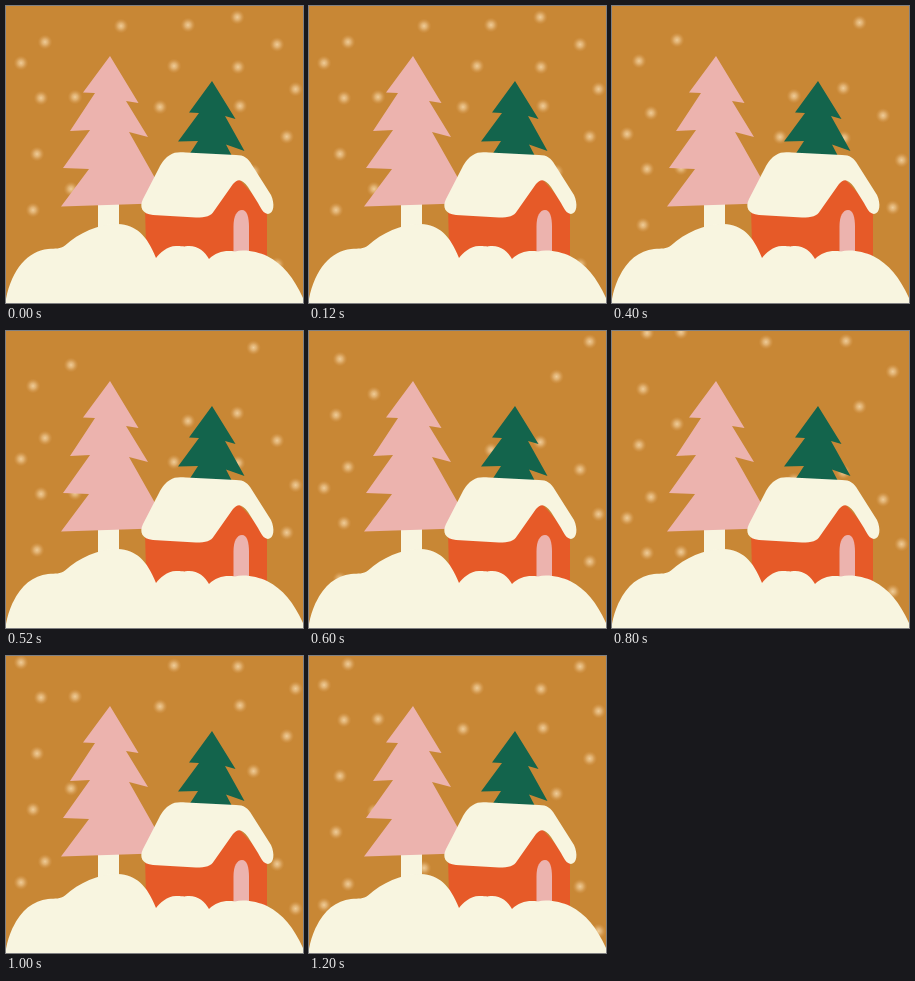
Write an HTML page that moves like this. It is 297 px wide and 297 px high and loops after 1400 ms.

```html
<!DOCTYPE html>
<html lang="en">
<head>
<meta charset="utf-8">
<title>Snowy cabin</title>
<style>
  html, body { margin: 0; width: 100%; height: 100%; overflow: hidden; background: #c88735; }
  svg { display: block; width: 100vw; height: 100vh; }
  .snow { fill: #f8f5e0; }
  .pink { fill: #ecb3ae; }
  .green { fill: #13644c; }
  .wall { fill: #e65a28; }
</style>
</head>
<body>
<svg viewBox="0 0 297 297" preserveAspectRatio="none">
  <defs>
    <radialGradient id="glow">
      <stop offset="0" stop-color="#f3d4a4" stop-opacity=".9"/>
      <stop offset=".4" stop-color="#ecc48c" stop-opacity=".65"/>
      <stop offset="1" stop-color="#d89c54" stop-opacity="0"/>
    </radialGradient>
    <circle id="flake" r="7.5" fill="url(#glow)"/>
  </defs>
  <rect width="297" height="297" fill="#c88735"/>
  <g id="snowfall"></g>

  <!-- trees -->
  <path class="snow" d="M92 196H113V230H92Z"/>
  <path class="pink" d="M104 50L132.500 97L120 95L142 131L123 126L149 172L163 197L55 200.500L83 163L57 162L84 124L64 125L89 87L77 86.500Z"/>
  <path class="green" d="M206 75L229.500 113L219 110L238.500 145L220 138.500L227 152H181L192 135L172 135.500L193 107L183 106.500Z"/>

  <!-- cabin -->
  <path class="wall" d="M139 200L232 172L261 204V260H142Q139 230 139 200Z"/>
  <path class="pink" d="M227.500 255V220C227.500 210 231 204 236 204S243 211 243 221V255Z"/>
  <path class="snow" d="M164 149C168 146 173 146 180 146.500L230 149C238 149 242 152 246 159L265 189C269 198 268 207 262 208C257 207 256 204 252 197L242 181C236 173 232 172 227 178L208 205C205 210 200 211.500 190 211.500L147 209C136 208 133 201 137 193L153 162C156 156 160 151 164 149Z"/>

  <!-- ground -->
  <path class="snow" d="M0 293C6 263 22 245 42 243C50 242.500 54 243 59 239.500C73 227 92 218 112 218C130 219 141 229 150 252C154 247 161 240 170 240S177 241 181 240C191 239 199 245 203 253C210 246 219 244 229 245.500C239 243 252 246 261 250C277 258 288 272 297 292V297H0Z"/>
</svg>
<script>
const PERIOD = 220, STEP = 200, LOOP = 1400;
const drops = [0, 44, 71, 100, 130, 169.5, 192];
const layer = document.getElementById("snowfall");

const strand = (count, place) => Array.from({ length: count }, (_, i) => place(i));

// Flakes hang on straight strands and one wide arc beside the cabin.
const line = (count, x, y, dx, dy) => strand(count, i => [x + dx * i, y + dy * i]);
const arc = (count, x, y, radius, from, turn) => strand(count, i => {
  const angle = (from + turn * i) * Math.PI / 180;
  return [x + radius * Math.cos(angle), y + radius * Math.sin(angle)];
});

function addFlake(x) {
  const flake = document.createElementNS("http://www.w3.org/2000/svg", "use");
  flake.setAttribute("href", "#flake");
  flake.setAttribute("x", x);
  return layer.appendChild(flake);
}

// Each flake has a copy one period lower, so the fall wraps seamlessly.
const flakes = [
  ...line(4, 39, 36, -4, 56),
  ...line(2, 69, 91, -4, 92),
  ...line(2, 15, 57, 100, -37),
  ...line(3, 182, 19, -14, 41),
  ...line(2, 232, 61, 2, 39),
  ...arc(5, 205, 92, 85, -72, 33)
].map(([x, y]) => ({ y, pair: [addFlake(x), addFlake(x)] }));

function draw(time) {
  const drop = drops[Math.floor((time % LOOP) / STEP)];
  for (const { y, pair } of flakes) {
    const top = (y + drop) % PERIOD;
    pair.forEach((flake, i) => flake.setAttribute("y", top + i * PERIOD));
  }
}

const begin = performance.now();
function tick(now) {
  draw(Math.max(0, now - begin));
  requestAnimationFrame(tick);
}
draw(0);
requestAnimationFrame(tick);
</script>
</body>
</html>
```
